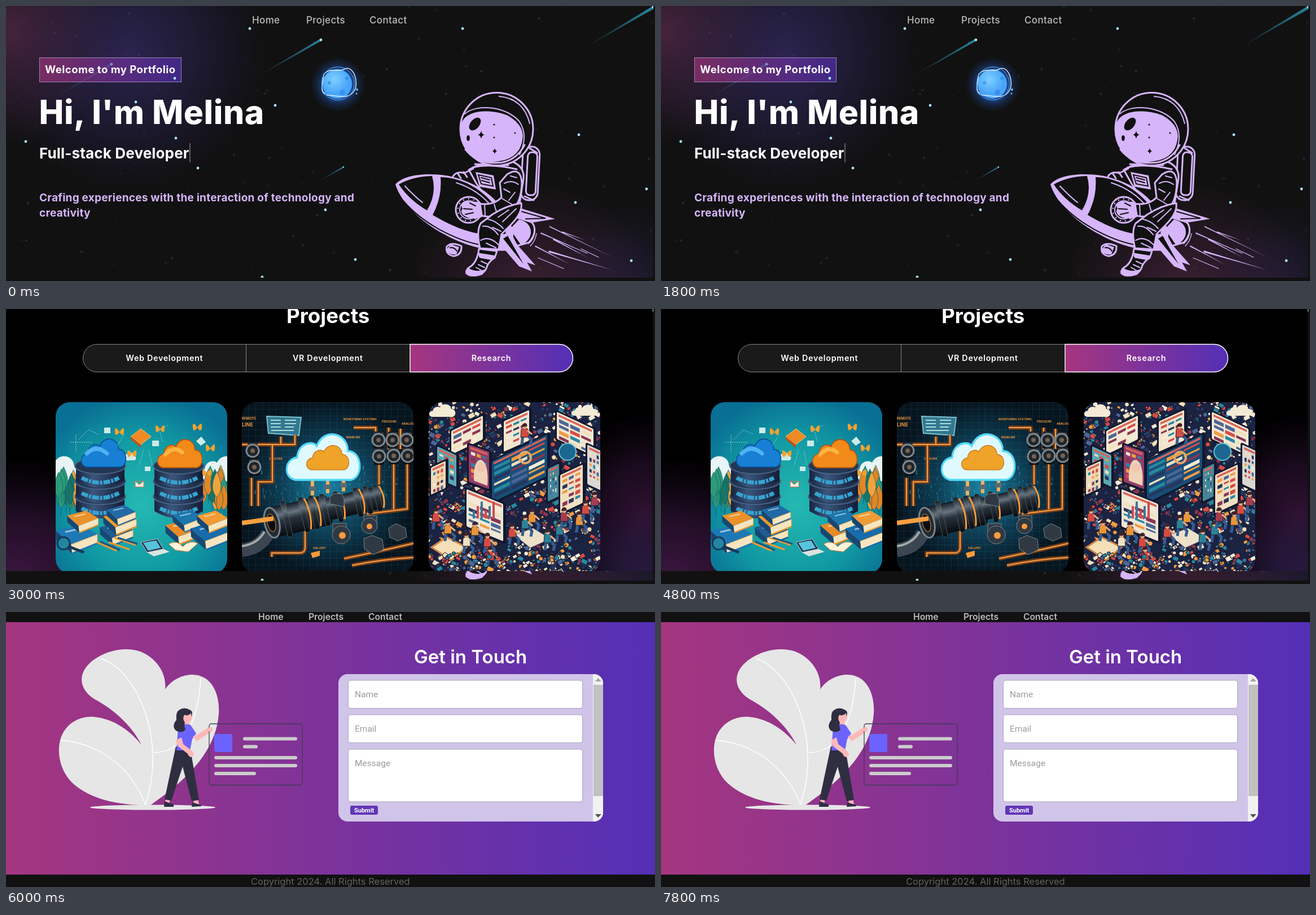
These frames come from a looping animation (1150 px wide and 487 px high, 9000 ms). An HTML page:

```html
<!DOCTYPE html>
<html lang="en">
<head>
<meta charset="utf-8">
<title>Portfolio</title>
<style>
html, body { margin: 0; width: 100%; height: 100%; overflow: hidden; background: #111; }
svg { display: block; width: 100vw; height: 100vh; }
text { font-family: Inter, sans-serif; font-weight: 700; fill: #fff; }
.nav text { font-size: 17px; font-weight: 500; fill: #bcbcbc; letter-spacing: .35px; }
.nav.low text { font-size: 15.7px; font-weight: 600; letter-spacing: 0; }
.tabs text { font-size: 14.3px; font-weight: 600; letter-spacing: .7px; text-anchor: middle; }
.form text { font: 15.5px Roboto, sans-serif; fill: #9b9b9b; }
.tiny text { font-size: 5px; fill: #e8933a; }
.lilac { fill: #d6b5fb; }
.dark { fill: #111; }
.line { fill: none; stroke: #d6b5fb; stroke-linecap: round; stroke-linejoin: round; }
.edge { stroke: #d6b5fb; stroke-width: 3; stroke-linejoin: round; }
.ink { fill: none; stroke: #111; stroke-width: 2; stroke-linecap: round; }
#projects { animation: middle 9s steps(1) infinite; }
#contact { animation: last 9s steps(1) infinite; }
@keyframes middle { 0% { visibility: hidden } 33.3333% { visibility: visible } 66.6667%, 100% { visibility: hidden } }
@keyframes last { 0% { visibility: hidden } 66.6667%, 100% { visibility: visible } }
</style>
</head>
<body>
<svg viewBox="0 0 1150 487" preserveAspectRatio="none">
<defs>
  <linearGradient id="brand" x1="-.0591" x2="1.1158"><stop stop-color="#aa367c"/><stop offset="1" stop-color="#4a2fbd"/></linearGradient>
  <linearGradient id="trail" x1="0" y1="1" x2="1" y2="0"><stop stop-color="#2b86a2" stop-opacity="0"/><stop offset="1" stop-color="#2b86a2"/></linearGradient>
  <radialGradient id="pink"><stop stop-color="#5a2a4a" stop-opacity=".7"/><stop offset=".45" stop-color="#4e2646" stop-opacity=".42"/><stop offset="1" stop-color="#4e2646" stop-opacity="0"/></radialGradient>
  <radialGradient id="indigo"><stop stop-color="#33285f" stop-opacity=".8"/><stop offset=".5" stop-color="#2b2453" stop-opacity=".5"/><stop offset="1" stop-color="#241f4c" stop-opacity="0"/></radialGradient>
  <radialGradient id="plum"><stop stop-color="#3c1740"/><stop offset=".5" stop-color="#2c1232" stop-opacity=".75"/><stop offset="1" stop-color="#1c0c22" stop-opacity="0"/></radialGradient>
  <radialGradient id="halo"><stop offset=".5" stop-color="#1d50a4"/><stop offset=".72" stop-color="#1a3a75" stop-opacity=".5"/><stop offset="1" stop-color="#163060" stop-opacity="0"/></radialGradient>
  <radialGradient id="planet" cx=".4" cy=".35"><stop stop-color="#7fd0ff"/><stop offset="1" stop-color="#48a4fa"/></radialGradient>
  <radialGradient id="teal" cy=".6" r=".65"><stop stop-color="#25b9b2"/><stop offset=".6" stop-color="#119aa3"/><stop offset="1" stop-color="#096f94"/></radialGradient>
  <radialGradient id="tech"><stop stop-color="#1681a2"/><stop offset=".55" stop-color="#0d3c53"/><stop offset="1" stop-color="#07151f"/></radialGradient>
  <linearGradient id="metal" x2="0" y2="1"><stop stop-color="#141a22"/><stop offset=".3" stop-color="#667480"/><stop offset=".5" stop-color="#2a323c"/><stop offset="1" stop-color="#080c11"/></linearGradient>
  <linearGradient id="drum"><stop stop-color="#17233f"/><stop offset=".35" stop-color="#3b567d"/><stop offset="1" stop-color="#121c36"/></linearGradient>
  <pattern id="mesh" width="12" height="12" patternUnits="userSpaceOnUse"><path d="M0 0H12M0 0V12" stroke="#3b91a8" stroke-opacity=".25" fill="none"/></pattern>
  <path id="cloud" d="M12 60C-6 58-4 34 14 33C15 15 36 12 41 19C52-5 85 4 84 25C105 25 106 58 88 60Z"/>
  <path id="spark" d="M0-7Q1-1 6 0Q1 1 0 7Q-1 1-6 0Q-1-1 0-7Z"/>
  <clipPath id="sky"><path d="M0 0H1147V481H0Z"/></clipPath>
  <clipPath id="page"><path d="M0 0H1146V464H0Z"/></clipPath>
  <clipPath id="card"><rect width="304" height="303" rx="25"/></clipPath>
  <clipPath id="pane"><rect x="589" y="110" width="469" height="261" rx="16"/></clipPath>
</defs>

<rect width="1150" height="487" fill="#111"/>
<g id="home" clip-path="url(#sky)">
  <ellipse cx="215" cy="85" rx="245" ry="240" fill="url(#indigo)"/>
  <ellipse cx="5" cy="45" rx="185" ry="200" fill="url(#pink)"/>
  <ellipse cx="1100" cy="500" rx="150" ry="150" fill="url(#indigo)" opacity=".55"/>
  <ellipse cx="930" cy="500" rx="220" ry="190" fill="url(#pink)" opacity=".85"/>
  <g id="dust" fill="#3d6f7c"></g>
  <g id="meteors" fill="url(#trail)">
    <path d="M440 128L557 58L560 61Z"/><path d="M1020 77L1146 0L1148 5Z"/>
    <path d="M78 167L186 101L189 104Z" opacity=".65"/><path d="M550 313L598 284L599 286Z"/>
  </g>
  <circle cx="588" cy="139" r="49" fill="url(#halo)"/>
  <circle cx="587" cy="138" r="26" fill="url(#planet)"/>
  <g fill="#2b82df" opacity=".55"><circle cx="596" cy="153" r="5"/><circle cx="573" cy="136" r="3"/><circle cx="604" cy="128" r="3"/></g>
  <path d="M563 121C576 107 588 119 601 111C616 105 626 137 617 150C608 167 584 158 570 158C553 155 562 134 563 121Z" fill="none" stroke="#d6edff" stroke-width="1.5"/>
  <path d="M560 132C561 111 591 99 608 116C625 132 618 161 593 166C573 169 557 154 560 132Z" fill="none" stroke="#58b6f5"/>
  <g fill="#65bdff"><circle cx="622" cy="148" r="2"/><circle cx="565" cy="154" r="1.5"/><circle cx="621" cy="155" r="1.5"/></g>
  <g class="nav"><text x="436" y="31">Home</text><text x="532" y="31">Projects</text><text x="644" y="31">Contact</text></g>
  <rect x="59.5" y="91.5" width="251" height="43" fill="url(#brand)" fill-opacity=".62" stroke="#b8a6c9" stroke-opacity=".75"/>
  <g id="stars" fill="#a9e2fb"></g>
  <text x="69" y="119" font-size="18.5" letter-spacing=".5">Welcome to my Portfolio</text>
  <text x="58.5" y="209" font-size="58.5" letter-spacing=".6" style="font-weight:800">Hi, I'm Melina</text>
  <text x="59" y="270" font-size="26" letter-spacing=".15">Full-stack Developer</text>
  <path d="M326 243V277" stroke="#737373" stroke-width="1.5"/>
  <g font-size="19" letter-spacing=".23"><text class="lilac" x="59" y="346">Crafing experiences with the interaction of technology and</text><text class="lilac" x="59" y="373">creativity</text></g>

  <g id="astronaut">
    <path class="lilac" d="M962 389L1077 446L964 392ZM970 412L1034 447L969 414ZM938 424L1000 458L937 426ZM962 433L1073 467L961 436ZM985 399L1028 415L985 401ZM948 401L1012 430L947 403Z"/>
    <path class="line" stroke-width="1.2" d="M976 415L1030 438M943 446L988 465M1019 430L1050 445"/>
    <path class="dark edge" d="M889 383Q913 363 934 386Q942 402 926 419L901 426Z"/>
    <path class="lilac" d="M905 356L973 377L930 384L898 374Z"/><path class="ink" d="M914 364L956 376L921 377"/>
    <path class="lilac" d="M909 378Q930 383 930 401Q930 414 913 424L893 395Z"/>
    <path class="line" stroke-width="1.5" d="M940 403Q938 416 929 425M937 401Q935 414 926 421"/>
    <rect class="dark edge" x="914" y="249" width="30" height="95" rx="14" transform="rotate(3 930 296)"/>
    <rect class="dark edge" x="923" y="259" width="17" height="76" rx="7" stroke-width="2" transform="rotate(3 930 296)"/>
    <path class="line" stroke-width="3" d="M925 250L941 260M919 337L935 344"/>
    <path class="dark edge" d="M820 290Q850 272 898 276Q919 285 917 306L910 350L862 354L834 315Z"/>
    <path class="line" stroke-width="3" d="M792 302Q798 292 812 296L828 288M800 296L806 305M811 294L817 303M831 280L890 282M827 286Q857 278 905 289"/>
    <path class="lilac" d="M832 294L864 300L868 325L839 320Z"/><path class="ink" d="M837 299L860 304L863 319L842 315ZM842 304L857 308M843 309L857 313"/>
    <path class="lilac" d="M690 316C704 299 744 294 785 301C828 311 860 330 883 364L899 397L899 432C865 438 815 426 778 405C735 383 700 348 690 316Z"/>
    <path class="dark" d="M696 316Q720 302 755 301Q764 332 746 362Q714 343 696 316ZM770 303C814 304 850 330 872 361L887 403Q830 415 756 370Q773 338 770 303Z"/>
    <path class="line" stroke-width="2" d="M707 319Q724 337 738 348M798 313Q838 326 861 356"/>
    <path class="ink" d="M704 345C740 387 804 420 855 425"/>
    <path class="lilac" d="M884 398L938 459L901 447Z"/>
    <path class="lilac" d="M872 418L892 397L932 470L909 461Z"/><path class="dark" d="M881 412L889 407L917 457Z"/>
    <circle class="dark edge" cx="820" cy="361" r="23"/><circle class="line" cx="820" cy="361" r="16" stroke-width="2"/>
    <circle class="line" cx="820" cy="361" r="19.5" stroke-dasharray=".1 9" stroke-width="2.5"/>
    <path class="dark edge" d="M888 298Q912 283 914 313Q913 348 897 360Q870 378 841 371L837 350Q864 354 878 339L875 313Z"/>
    <path class="line" stroke-width="2" d="M883 314Q896 307 908 316M882 324L893 330M879 341L898 352M865 351L871 371M848 351L849 371M902 330L891 344M894 301L905 304"/>
    <path class="lilac" d="M841 347L845 373Q825 381 811 371Q804 364 809 359Q803 350 816 346Z"/><path class="ink" d="M811 359L826 360M814 369L828 366M822 349L832 354"/>
    <path class="dark edge" d="M862 369Q887 353 913 349Q916 366 893 389L878 404L873 431L840 429Q833 399 841 385Z"/>
    <path class="line" stroke-width="2" d="M852 377Q870 381 881 394M845 390Q859 388 872 405M841 415Q856 406 873 423M891 361L872 374M904 359L880 382M862 392L877 399M851 420L868 428"/>
    <path class="dark edge" d="M838 430L870 434L866 446Q854 453 851 465Q844 479 822 477Q811 473 819 464Q835 456 838 430Z"/>
    <path class="lilac" d="M836 437L867 442L861 450L839 446ZM818 463Q832 473 850 466L844 476Q824 482 814 474Z"/><path class="line" stroke-width="2" d="M842 452L853 457M837 458L848 463M833 463L842 468"/>
    <path class="dark edge" d="M807 425Q789 417 781 426Q778 440 793 443Q808 441 807 425Z"/><path class="lilac" d="M788 422L803 427L798 440Q781 441 781 431Z"/><path class="ink" d="M787 428Q795 427 799 434"/>
    <circle class="dark edge" cx="869.5" cy="218" r="64.5" stroke-width="4"/>
    <path class="line" stroke-width="2" d="M813 191C835 172 888 178 910 205Q926 230 910 263M874 160Q917 164 928 208"/>
    <path class="lilac" d="M807 207C817 182 861 183 887 193C908 204 919 220 915 237Q911 265 883 273C850 281 825 274 811 248Q802 225 807 207Z"/>
    <path class="line" stroke-width="3" d="M814 254Q836 282 879 277Q905 272 919 246"/>
    <g class="dark"><ellipse cx="831" cy="209" rx="13" ry="8" transform="rotate(-50 831 209)"/><ellipse cx="819" cy="234" rx="2.8" ry="5"/><use href="#spark" x="842" y="228"/><use href="#spark" transform="translate(866 257) scale(.75)"/><circle cx="865" cy="210" r="1.6"/><circle cx="865" cy="233" r="1.4"/><circle cx="902" cy="225" r="1.4"/></g>
  </g>
</g>

<g id="projects" clip-path="url(#page)">
  <rect width="1146" height="464" fill="#000"/>
  <ellipse cx="20" cy="475" rx="250" ry="215" fill="url(#plum)"/>
  <ellipse cx="1130" cy="370" rx="150" ry="190" fill="url(#plum)" opacity=".8"/>
  <ellipse cx="1130" cy="480" rx="150" ry="130" fill="url(#indigo)" opacity=".7"/>
  <text x="497" y="25" font-size="36.7">Projects</text>
  <g class="tabs">
    <rect x="136.5" y="62.5" width="868" height="49" rx="24.5" fill="#1a1a1a" stroke="#858585"/>
    <path d="M425.5 63V111" stroke="#858585"/>
    <path d="M716 62.5H980A24.5 24.5 0 0 1 980 111.5H716Z" fill="url(#brand)" stroke="#fff" stroke-width="1.4"/>
    <text x="280.8" y="92">Web Development</text><text x="570.3" y="92">VR Development</text><text x="860" y="92">Research</text>
  </g>

  <g transform="translate(88 165)" clip-path="url(#card)">
    <rect width="304" height="303" fill="url(#teal)"/>
    <g fill="#e8f4f5"><use href="#cloud" transform="translate(-35 92) scale(.8)"/><use href="#cloud" transform="translate(253 92) scale(.8)"/><use href="#cloud" transform="translate(117 88) scale(.25)"/></g>
    <g id="leaves"></g><g id="drums"></g>
    <use href="#cloud" fill="#1780d4" stroke="#0b4f96" stroke-width="2" transform="translate(46 61) scale(.78 .9)"/><path d="M55 91Q72 74 91 91" fill="none" stroke="#4fb2f2" stroke-width="7" stroke-linecap="round"/>
    <use href="#cloud" fill="#f18a18" stroke="#b95410" stroke-width="2" transform="translate(181 62) scale(.78 .9)"/><path d="M194 93Q209 76 224 89" fill="none" stroke="#ffb444" stroke-width="7" stroke-linecap="round"/>
    <path d="M133 61L151 47L169 61L151 75Z" fill="#ef8a26" stroke="#f9c66a"/><path d="M133 61L151 75V81L133 66Z" fill="#b8551b"/>
    <path d="M141 140H156V150H141ZL148 146L156 140" fill="#f5efe2" stroke="#dc7651"/>
    <g fill="#cdebe7"><path d="M86 45H97V55H86ZM249 69L258 61L266 71L257 77ZM171 68H183V78H171ZM158 114H168V122H158ZM126 94H139V103H126Z"/></g>
    <path d="M26 71H65M36 58V89M41 66L58 49L76 57M189 70L184 49L200 40M121 57L110 76M156 84L148 112M165 86L171 111" fill="none" stroke="#a6dedc" stroke-dasharray="2 2"/>
    <g id="butterflies" fill="#f4a22d"></g>
    <g id="books"></g>
    <path d="M151 248L180 242L191 260L162 266Z" fill="#26344d" stroke="#b6c6cc"/><path d="M155 249L178 245L186 258L164 263Z" fill="#57c3dc"/><path d="M162 266L191 260L202 265L174 273Z" fill="#dbe3df"/>
    <path d="M200 251Q216 243 225 256Q237 243 252 250L235 265L212 262Z" fill="#fff3d9" stroke="#d07736"/>
    <circle cx="14" cy="250" r="11" fill="#2385a4" stroke="#173856" stroke-width="3"/><path d="M24 256L50 266" stroke="#173856" stroke-width="5"/>
    <path d="M73 248L108 263M94 248L131 261M104 240L142 253" stroke="#ed9a32" stroke-width="3"/><path d="M79 247L114 262M110 240L145 251" stroke="#1c5489" stroke-width="3"/>
  </g>

  <g transform="translate(418 165)" clip-path="url(#card)">
    <rect width="304" height="303" fill="url(#tech)"/><rect width="304" height="303" fill="url(#mesh)"/>
    <g id="code" fill="#37b9cc"></g>
    <path d="M44 25L105 27L101 59L47 55Z" fill="#347790" stroke="#78c2cd" stroke-width="2"/><path d="M51 32H69M51 38H69M51 44H69M76 32H96M76 38H96M76 44H92M52 50H92" stroke="#a9dfde" stroke-width="2"/>
    <g class="tiny"><text x="0" y="31" style="font-size:6px">REMOTE</text><text x="0" y="43" style="font-size:9px">LINE</text><text x="180" y="32">MONITORING SYSTEMS</text><text x="248" y="36">PRESSURE</text><text x="283" y="40">ANALOG</text><text x="48" y="102">SENSORS</text><text x="185" y="64">MAINLINE</text><text x="126" y="260">GALLERY</text></g>
    <g fill="none" stroke-linejoin="round"><g stroke="#7c3f18" stroke-width="7"><path id="pipes" d="M0 75H94V58M69 74V61M54 76V141H29V184M198 45H237V82M260 45V84M281 47V83M243 110V146M269 103V190M293 104V189L221 198M17 134V184M0 213L60 207M112 207V257Q112 268 100 267H53V274M181 277Q249 263 304 250M195 289Q249 278 304 275"/></g><use href="#pipes" stroke="#f4a34c" style="stroke-width:2px"/></g>
    <g id="valves"></g>
    <path d="M0 262Q32 259 46 232" fill="none" stroke="#3b4652" stroke-width="24"/><path d="M0 255Q28 251 40 229" fill="none" stroke="#a2a9a9" stroke-width="4"/>
    <g transform="rotate(-13 150 188)"><rect x="46" y="164" width="110" height="54" rx="8" fill="url(#metal)"/><rect x="150" y="170" width="100" height="40" rx="8" fill="url(#metal)"/><g id="rings"></g><ellipse cx="50" cy="191" rx="13" ry="27" fill="#202a33" stroke="#78838a" stroke-width="3"/><ellipse cx="49" cy="191" rx="7" ry="16" fill="#090d12" stroke="#dc8b38"/></g>
    <path d="M0 214L56 206" stroke="#f7a040" stroke-width="8"/>
    <g fill="#303943" stroke="#78858c"><path d="M156 180V167L163 162H177L181 171V185ZM161 215H185V239H161ZM216 201H239V220H216Z"/><circle cx="176" cy="235" r="16"/><circle cx="226" cy="219" r="14"/><path d="M216 242L231 236L249 243L251 261L233 270L217 260ZM260 223L273 215L290 223L292 239L276 246L262 239Z"/></g>
    <g fill="#ff9a3b"><circle cx="178" cy="236" r="6"/><circle cx="226" cy="220" r="5"/><path d="M122 267L138 263V272L125 276Z"/></g>
    <g stroke="#ffad57" stroke-width="6"><path d="M125 139V165M152 138V161M180 137V158"/><path d="M119 153H131M146 150H158M174 147H186" stroke="#596b75" stroke-width="8"/></g>
    <use href="#cloud" transform="translate(80 50) scale(1.28 1.46)" fill="#dffaff" stroke="#51d9ff" stroke-width="2.5"/><use href="#cloud" transform="translate(115 73) scale(.74 .78)" fill="#f0a329" stroke="#cf7b20" stroke-width="2"/>
  </g>

  <g transform="translate(749 165)" clip-path="url(#card)"><rect width="304" height="303" fill="#1b2342"/><g id="collage"></g></g>
</g>

<g id="contact">
  <rect width="1150" height="487" fill="#111"/><rect y="18" width="1150" height="447" fill="url(#brand)"/>
  <g class="nav low"><text x="447" y="14">Home</text><text x="536" y="14">Projects</text><text x="642" y="14">Contact</text></g>
  <path d="M282 137C297 115 325 106 346 114C368 122 379 150 377 180C373 235 338 285 256 342C200 343 150 332 118 303C96 282 90 250 96 227C104 197 133 180 165 187C197 193 222 213 240 235C222 200 190 172 158 155C130 138 127 112 147 92C170 70 208 60 238 70C268 82 285 110 282 137Z" fill="#e6e6e6"/>
  <path d="M168 82C235 105 285 230 247 341M97 227C160 232 220 270 247 341M262 249C318 249 340 190 345 118" fill="none" stroke="#fff" stroke-width="1.5"/>
  <ellipse cx="260" cy="346" rx="111" ry="4.5" fill="#e6e6e6"/>
  <g fill="#ffb8b8"><path d="M284 329L291 331L289 340L281 338ZM332 332L340 331L342 340L333 341ZM313 188L324 188L326 206L311 207Z"/><circle cx="321" cy="186" r="9"/></g>
  <path d="M301 238Q292 280 281 332L293 334L313 274L329 335L342 333L327 244Z" fill="#2f2e41"/>
  <path d="M281 335L297 341V345H280ZM330 337L346 342V344L329 345Z" fill="#2f2e41"/>
  <path d="M305 204Q316 196 327 200L337 215L330 225L326 245H302Z" fill="#6c63ff"/>
  <path d="M301 227L311 222L314 234L331 247Q336 255 328 257Q323 256 322 251L304 237ZM331 220L338 218L359 204Q365 203 366 209L362 213L338 229Z" fill="#ffb8b8"/>
  <path d="M328 185Q333 176 325 173Q314 167 304 176Q301 181 302 191Q293 202 301 210Q312 216 318 208Q315 201 317 196Q312 188 316 182Q322 185 328 179Z" fill="#2f2e41"/>
  <rect x="360" y="198" width="165" height="108.5" rx="4" fill="none" stroke="#3f3d56" stroke-width="1.3"/>
  <rect x="369" y="216" width="32" height="32" rx="3" fill="#6c63ff"/>
  <path d="M423 224.5H513M423 238.5H443M372 258H513M372 272H513M372 286H440" stroke="#ccc" stroke-width="6" stroke-linecap="round"/>
  <circle cx="362" cy="208" r="4" fill="#ffb8b8"/>
  <text x="723" y="91" font-size="33" style="font-weight:600">Get in Touch</text>
  <g class="form" clip-path="url(#pane)">
    <rect x="589" y="110" width="469" height="261" fill="#d0c4e9"/>
    <rect x="1040" y="110" width="18" height="261" fill="#f1f1f1"/><rect x="1041" y="129" width="17" height="197" fill="#c1c1c1"/>
    <path d="M1044 123L1049 117L1055 123Z" fill="#a3a3a3"/><path d="M1044 358L1049 364L1055 358Z" fill="#505050"/>
    <g fill="#fff" stroke="#9b94a9" stroke-width=".8"><rect x="606.5" y="121" width="415" height="49.5" rx="4"/><rect x="606.5" y="182" width="415" height="49.5" rx="4"/><rect x="606.5" y="243" width="415" height="93" rx="4"/></g>
    <text x="618" y="151">Name</text><text x="618" y="212">Email</text><text x="618" y="273">Message</text>
    <rect x="610" y="343" width="49" height="16" rx="3" fill="#6235b7"/><text x="617" y="355" style="font-size:11px;font-weight:700;fill:#fff">Submit</text>
  </g>
  <text x="434" y="483" font-size="16.5" style="font-weight:400;fill:#626262">Copyright 2024. All Rights Reserved</text>
</g>
</svg>
<script>
let seed = 73;
const rand = (a, b) => a + (b - a) * ((seed = (seed * 16807) % 2147483647) / 2147483647);
const pick = list => list[Math.floor(rand(0, list.length))];
const repeat = (n, make) => Array.from({ length: n }, (_, i) => make(i)).join('');
const fill = (id, markup) => { document.getElementById(id).innerHTML = markup; };
const dot = (x, y, r, extra = '') => `<circle cx="${x}" cy="${y}" r="${r}" ${extra}/>`;
const box = (x, y, w, h, extra = '') => `<rect x="${x}" y="${y}" width="${w}" height="${h}" ${extra}/>`;

fill('dust', repeat(260, () => dot(rand(0, 1146), rand(0, 481), pick([.8, 1, 1.2, 2.4]), `opacity="${rand(.1, .28)}"`)));
const stars = [[432, 40], [809, 40], [299, 128], [477, 176], [230, 170], [35, 240], [301, 234], [340, 287], [1015, 228], [1135, 324], [1009, 348], [566, 361], [619, 449], [1108, 451], [454, 480], [558, 60], [1147, 2]];
fill('stars', stars.map(([x, y]) => dot(x, y, 2.4)).join('') + dot(187, 103, 2.4, 'opacity=".5"') + dot(598, 285, 1.2));

fill('leaves', repeat(26, i => {
  const side = i % 2, x = side ? rand(255, 300) : rand(4, 42), y = rand(150, 195);
  return `<path d="M${x} ${y}q-15-16 0-46q15 30 0 46v15" fill="${pick(['#e18626', '#167468', '#2d9b79', '#f0a43b'])}" stroke="#125b62" stroke-width=".7"/>`;
}));
const drum = x => repeat(3, i => {
  const y = 184 - i * 27;
  return `<path d="M${x - 43} ${y - 17}V${y + 9}Q${x} ${y + 35} ${x + 43} ${y + 9}V${y - 17}Z" fill="url(#drum)"/><path d="M${x - 33} ${y + 4}Q${x} ${y + 21} ${x + 33} ${y + 4}" fill="none" stroke="#37a3d0" stroke-width="7" stroke-dasharray="12 2 4 2"/><ellipse cx="${x}" cy="${y - 17}" rx="45" ry="14" fill="#243754" stroke="#4a6587" stroke-width="2"/>`;
});
fill('drums', drum(79) + drum(218));
fill('butterflies', [[113, 53], [185, 48], [251, 45], [274, 82], [135, 92], [268, 126]].map(([x, y]) => `<path d="M${x} ${y}q-9-14-8 0q1 10 8 0q9-14 8 0q-1 10-8 0"/>`).join(''));
const book = ([x, y, s, hue]) => `<g transform="translate(${x} ${y}) scale(${s})"><path d="M0 12L45 0L74 18L27 36Z" fill="${hue}"/><path d="M27 36L74 18V33L29 52Z" fill="#f6e5bf" stroke="#ca9a58"/><path d="M0 12L27 36L29 52L1 28Z" fill="#174772"/><path d="M29 52L74 34" stroke="${hue}" stroke-width="3"/><path d="M17 14L43 8" stroke="#ffffff88" stroke-width="3"/></g>`;
fill('books', [[0, 216, 1, '#1e78b6'], [20, 192, .75, '#e9922c'], [78, 212, .8, '#205b91'], [84, 193, .8, '#ee982c'], [90, 182, .7, '#206aa5'], [194, 208, .85, '#e78a29'], [207, 191, .75, '#1b77ad'], [239, 212, .95, '#176cab'], [250, 192, .75, '#f19b35']].map(book).join(''));

fill('code', repeat(120, () => box(rand(20, 285), rand(110, 180), 1.5, rand(1, 7), `opacity="${rand(.2, .7)}"`)));
fill('valves', [[19, 86], [22, 115], [242, 67], [267, 67], [292, 67], [243, 96], [269, 95], [294, 95]].map(([x, y]) =>
  box(x - 9, y - 15, 18, 30, 'rx="3" fill="url(#metal)"') + dot(x, y, 11, 'fill="#1d262e" stroke="#82888a" stroke-width="3"') + dot(x, y, 4, 'fill="#78614b"')).join(''));
fill('rings', [72, 104, 122, 142, 166, 202, 220, 238].map((x, i) => {
  const r = 33 - i * 1.3;
  return box(x, 190 - r, 9, r * 2, 'rx="4" fill="url(#metal)" stroke="#59666e" stroke-width=".7"') + (i % 3 ? `<path d="M${x + 11} ${194 - r}q8 ${r - 4} 0 ${r * 2 - 8}" fill="none" stroke="#ff9d36" stroke-width="3"/>` : '');
}).join(''));

const hues = ['#f0dfbd', '#d84b46', '#2888a0', '#ef9c45', '#f5ead5', '#29345b', '#4c6696', '#8a3552'];
const bits = (n, x0, y0, x1, y1) => repeat(n, () => {
  const x = rand(x0, x1), y = rand(y0, y1), s = rand(2, 9);
  return pick([0, 1]) ? dot(x, y, s / 2, `fill="${pick(hues)}" stroke="#141a32"`) : box(x, y, s * 1.4, s, `fill="${pick(hues)}" stroke="#141a32" transform="rotate(${pick([-28, 28])} ${x} ${y})"`);
});
const screen = ([x, y, w, h, skew, hue]) => `<g transform="translate(${x} ${y}) skewY(${skew})">` +
  box(-3, -3, w + 8, h + 7, 'rx="4" fill="#11182f"') + box(0, 0, w, h, `rx="2" fill="${hue}"`) + box(3, 3, w - 6, 4, 'fill="#d9645a"') +
  repeat(Math.floor(h / 12) * 3, i => box(4 + (i % 3) * (w - 6) / 3, 11 + Math.floor(i / 3) * 10, (w - 14) / 3, rand(3, 7), `fill="${pick(hues)}"`)) + '</g>';
const person = ([x, y]) => {
  const shirt = pick(['#d44b41', '#e99538', '#2c8398', '#efe1c4', '#a53c50']);
  return `<g transform="translate(${x} ${y})"><path d="M-3 13L-5 30M4 13L12 21L10 31" stroke="#345d91" stroke-width="5" fill="none"/><path d="M-6 3Q0-2 6 3L7 17H-7Z" fill="${shirt}" stroke="#241d30"/><path d="M5 5L13 12" stroke="#e5ad82" stroke-width="3"/>${dot(0, -2, 4, 'fill="#e5ad82"')}<path d="M-5-1Q-5-8 1-8Q6-6 4-2Z" fill="#40242b"/></g>`;
};
const screens = [[40, 51, 56, 42, -26, '#f4e8d0'], [133, 34, 45, 54, -24, '#f2e5cf'], [227, 17, 65, 48, 25, '#f3e7d4'], [15, 78, 34, 56, 25, '#59a7b4'], [4, 116, 26, 48, -25, '#ecd9b6'], [112, 105, 98, 73, -26, '#174e78'], [71, 75, 36, 66, 20, '#943c69'], [67, 154, 65, 66, 22, '#eee7d6'], [211, 118, 20, 58, -25, '#45869a'], [233, 129, 40, 68, -25, '#f1dfc2'], [281, 75, 25, 70, 25, '#d9d9d2']];
const crowd = [[170, 45], [183, 196], [171, 207], [34, 216], [67, 238], [104, 239], [148, 222], [232, 218], [240, 194], [267, 201], [278, 181], [109, 263], [82, 219], [211, 232], [294, 166], [13, 195]];
fill('collage', bits(1300, -5, -5, 304, 303) +
  `<g fill="#f5ead5"><use href="#cloud" transform="translate(1 2) scale(.46 .4)"/><use href="#cloud" transform="translate(253 3) scale(.46 .35)"/></g>` +
  screens.map(screen).join('') +
  `<path d="M80 139Q79 102 93 102Q107 109 104 148Z" fill="#efd3ba"/>` + dot(93, 116, 8, 'fill="#f2c5ae"') + dot(171, 98, 10, 'fill="none" stroke="#e3a66b" stroke-width="4"') + dot(246, 88, 15, 'fill="#1b6791" stroke="#62c5d7" stroke-width="2"') +
  `<path d="M5 257L32 239L67 257L40 280Z" fill="#f4dfb7" stroke="#d28441" stroke-width="3"/><path d="M151 235L185 223L216 242L180 258Z" fill="#eee1ca" stroke="#51516b"/>` +
  repeat(6, i => box(78 + i * 7, 192 - (i % 3) * 8, 4, 14 + (i % 3) * 8, `fill="${i % 2 ? '#cf4b57' : '#3c789b'}"`)) +
  crowd.map(person).join('') + bits(130, 0, 268, 304, 303));
</script>
</body>
</html>
```
